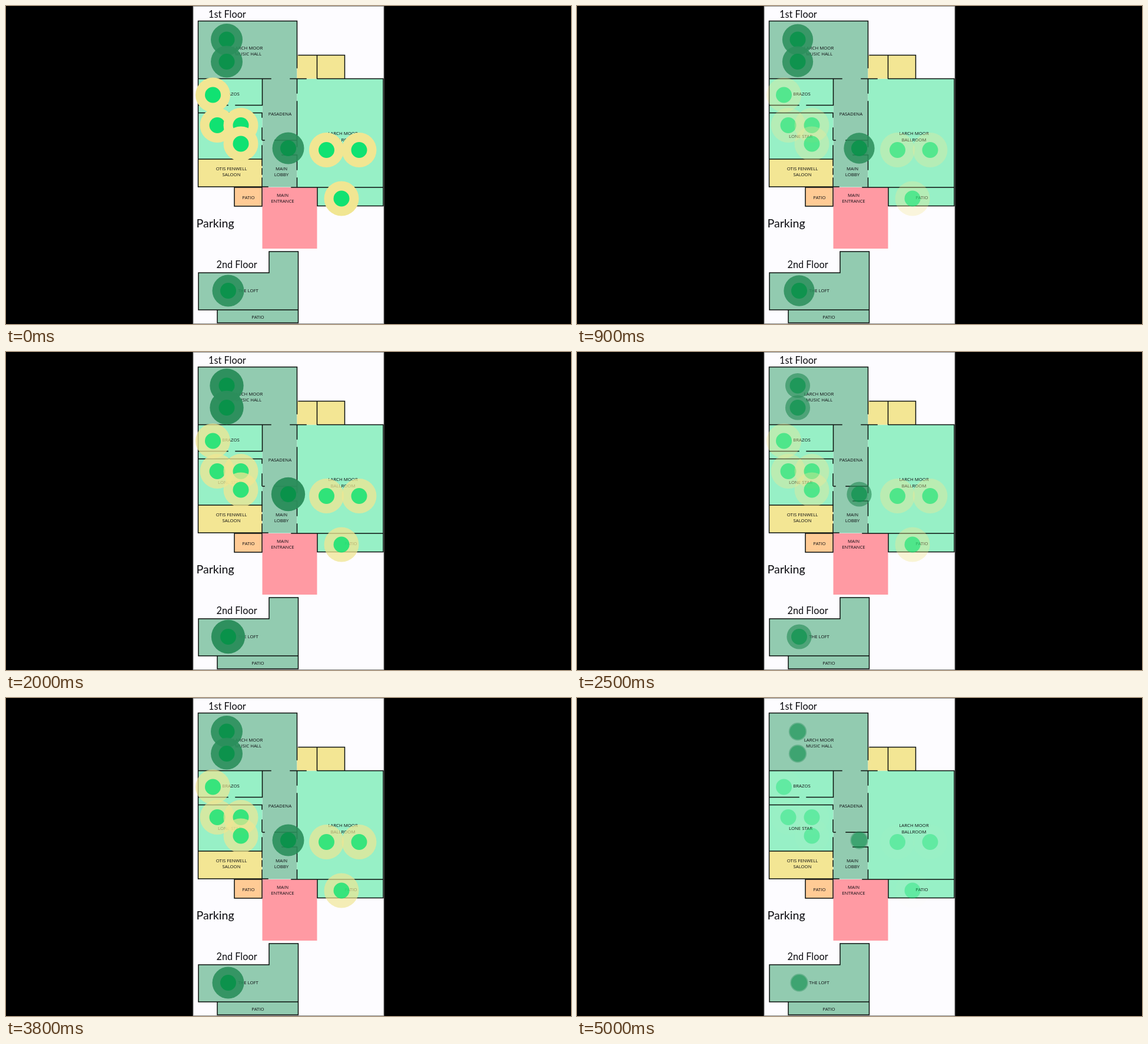
An HTML page for the animation above (5.1 s loop, 960 by 540 pixels).

```html
<!DOCTYPE html>
<html lang="en">
<head>
<meta charset="utf-8">
<title>Venue floor plan</title>
<style>
  html, body { margin: 0; width: 100%; height: 100%; overflow: hidden; background: #000; }
  svg { display: block; width: 960px; height: 540px; }
  text { fill: #0c0c10; }
  .title { font-family: Lato, sans-serif; }
  #labels { font: 7.8px "Open Sans", sans-serif; text-anchor: middle; }
  .walls { fill: none; stroke: #0a0f0c; stroke-width: 1.5; stroke-linecap: square; }
</style>
</head>
<body>
<svg viewBox="0 0 960 540">
  <rect x="318" y=".5" width="324" height="539" fill="#fdfcff" stroke="#8a8a8a"/>

  <g fill="#92cbb0">
    <path d="M326.5 25.5H494.5V123.5H326.5Z"/>
    <path d="M435.5 123H494.5V307.5H435.5Z"/>
    <path d="M327 453H447V417H496.5V516H327Z"/>
    <path d="M359 516H496.5V538H359Z"/>
  </g>
  <g fill="#97f0c6">
    <path d="M326.5 123.5H435.5V260H326.5Z"/>
    <path d="M494.5 123.5H641V308H494.5Z"/>
    <path d="M529 308H641V339.5H529Z"/>
  </g>
  <path fill="#f3e694" d="M326.5 260H435V307H326.5ZM494.5 83.5H575.5V123.5H494.5Z"/>
  <path fill="#ffcb95" d="M388 308H435V340H388Z"/>
  <path fill="#ff9aa3" d="M435.5 308H528.5V412H435.5Z"/>

  <g class="walls">
    <path d="M326.5 307V25.5H494.5V105M326.5 123.5H450M483 123.5H510"/>
    <path d="M497 83.5H575.5V123M528.5 84V123M529 123.5H641V339.5H529V308M485 308H641"/>
    <path d="M494.5 124V148M494.5 162V239M494.5 253V278M494.5 292V307"/>
    <path d="M435.5 124V168.5H390M327 168.5H377M327 181.5H435V189M435 207V227M435 237V271M435 276V286M435 292V307"/>
    <path d="M436 228H439M457 228H494M469 253H494M327 260H435M327 307H445"/>
    <path d="M388 308H435V340H388Z"/>
    <path d="M327 453H447V417H496.5V516H327ZM359 516V538H496.5V516"/>
  </g>

  <g class="title">
    <text x="344" y="19.5" font-size="16.3">1st Floor</text>
    <text x="357.5" y="445" font-size="16.3">2nd Floor</text>
    <text x="323.5" y="376" font-size="19.6">Parking</text>
  </g>
  <g id="labels"></g>
  <g id="markers"></g>
</svg>
<script>
const LOOP = 5100, STEP = 100;
const FADE = 1700, GROW = 950;
const DOT = 13.5, HALO = 29.5;

const labels = [
  ["LARCH MOOR", 411, 71], ["MUSIC HALL", 411.5, 81.5],
  ["BRAZOS", 382, 149.5], ["PASADENA", 465.5, 183],
  ["LONE STAR", 380, 221.5],
  ["LARCH MOOR", 572.5, 216.5], ["BALLROOM", 572.5, 227],
  ["OTIS FENWELL", 383, 276], ["SALOON", 383, 286.5],
  ["MAIN", 468, 276], ["LOBBY", 468, 286.5],
  ["PATIO", 412, 325.5], ["PATIO", 586, 325.5],
  ["MAIN", 470, 321], ["ENTRANCE", 470, 331.5],
  ["THE LOFT", 411.5, 483.5], ["PATIO", 428, 528]
];
const growing = [[375, 57], [375, 94.5], [479.5, 241.5], [377.5, 483.5]];
const fading = [[351.5, 151], [359, 202.5], [399, 202.5], [399, 234],
                [544.5, 244.5], [600, 244.5], [570, 327]];

function add(parentId, tag, attrs, text = "") {
  const el = document.createElementNS("http://www.w3.org/2000/svg", tag);
  for (const key in attrs) el.setAttribute(key, attrs[key]);
  el.textContent = text;
  return document.getElementById(parentId).appendChild(el);
}

function makeMarker([cx, cy], haloColor, dotColor) {
  return {
    halo: add("markers", "circle", { cx, cy, r: HALO, fill: haloColor }),
    dot: add("markers", "circle", { cx, cy, r: DOT, fill: dotColor })
  };
}

for (const [text, x, y] of labels) add("labels", "text", { x, y: y + 2.8 }, text);
const darkMarkers = growing.map(p => makeMarker(p, "#2b8f5c", "#08924a"));
const lightMarkers = fading.map(p => makeMarker(p, "#f1e692", "#10e272"));

function setOpacity(marker, halo, dot) {
  marker.halo.setAttribute("opacity", halo);
  marker.dot.setAttribute("opacity", dot);
}

function draw(time) {
  const t = Math.floor((time % LOOP) / STEP) * STEP;

  // Dark halos swell and strengthen, then snap back to the dot.
  const grow = ((t + 800) / GROW) % 1;
  for (const m of darkMarkers) {
    m.halo.setAttribute("r", DOT + 16 * grow);
    setOpacity(m, grow && 0.35 + 0.65 * grow, 0.35 + 0.65 * grow);
  }

  // Light halos keep their size and fade away.
  const glow = (1 - (t % FADE) / FADE) ** 1.5;
  for (const m of lightMarkers) setOpacity(m, glow, 0.4 + 0.6 * glow);
}

const start = performance.now();
function tick() {
  draw(performance.now() - start);
  requestAnimationFrame(tick);
}
tick();
</script>
</body>
</html>
```
